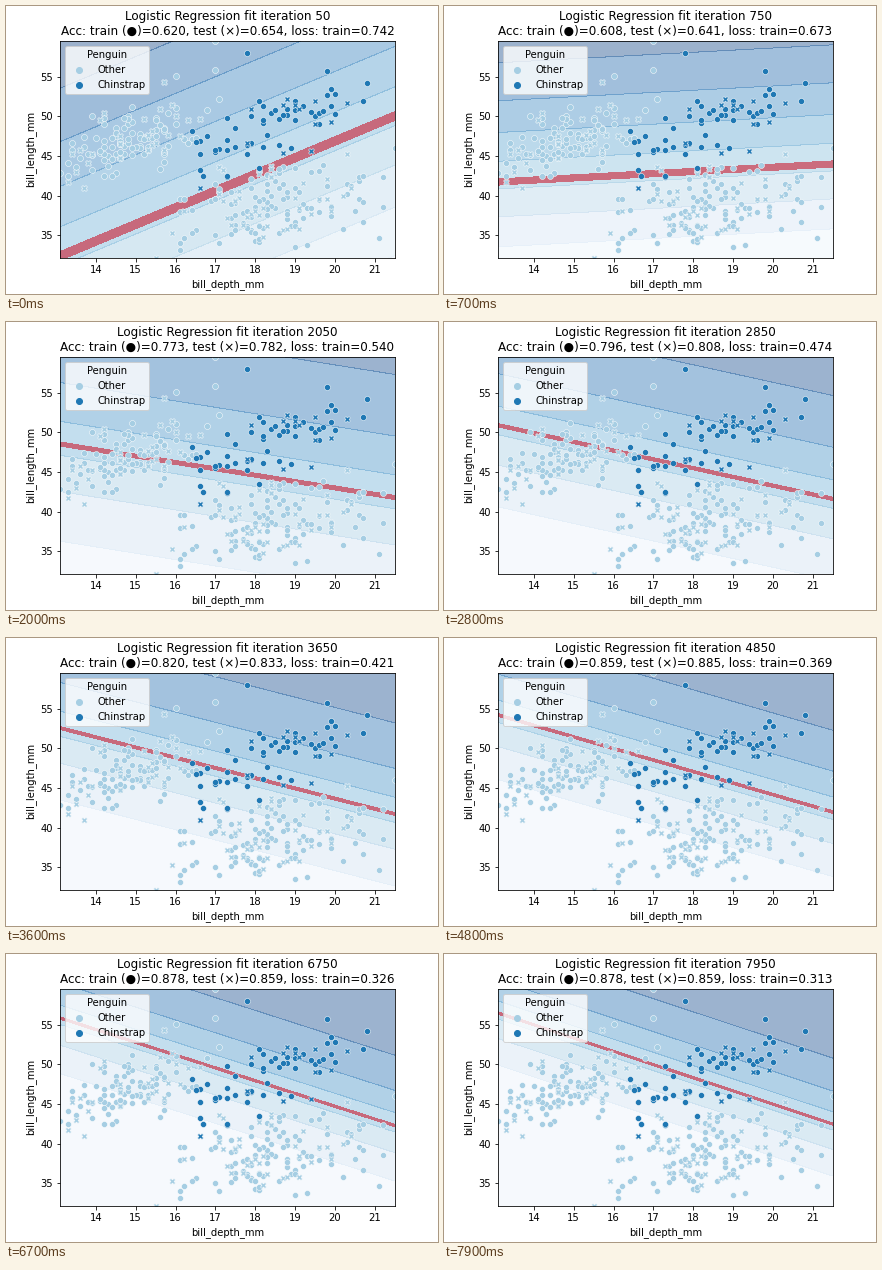
Write a matplotlib script that moves like this. It is 432 by 288 pixels and loops after 8 s.

```python
import numpy as np
import matplotlib.pyplot as plt
from matplotlib.animation import FuncAnimation

plt.rcParams.update({"font.family": "DejaVu Sans", "font.size": 10})

FRAMES, STEP = 80, 100
N_TRAIN, N_TEST = 255, 78
X0, X1, Y0, Y1 = 13.1, 21.5, 32.1, 59.6
LIGHT, DARK = "#a6cee3", "#1f78b4"

# Chinstrap penguins as (bill length, bill depth); the last 13 are test data.
CHINSTRAP = np.array([
    46.5, 17.9, 50, 19.5, 51.3, 19.2, 52.7, 19.8, 45.2, 17.8, 46.1, 18.2,
    51.3, 18.2, 46, 18.9, 51.3, 19.9, 47, 17.3, 52, 18.1, 45.9, 17.1,
    50.5, 19.6, 50.3, 20, 58, 17.8, 46.4, 18.6, 49.2, 18.2, 42.4, 17.3,
    48.5, 17.5, 43.2, 16.6, 50.6, 19.4, 46.7, 17.9, 52, 19, 50.5, 18.4,
    49.5, 19, 46.4, 17.8, 52.8, 20, 54.2, 20.8, 42.5, 16.7, 51, 18.8,
    49.7, 18.6, 47.5, 16.8, 47.6, 18.3, 52, 20.7, 46.9, 16.6, 53.5, 19.9,
    46.2, 17.5, 45.5, 17, 50.8, 18.5, 50.1, 17.9, 49, 19.6, 49.8, 17.3,
    48.1, 16.4, 50.7, 19.7, 42.5, 17.3, 45.2, 16.6, 50.2, 18.8, 46.8, 16.5,
    45.7, 17, 55.8, 19.8, 43.5, 18.1, 49.6, 18.2, 50.8, 19, 50.2, 18.7,
    45.7, 17.3,
    50.9, 17.9, 52.2, 18.8, 40.9, 16.6, 45.6, 19.4, 51.7, 20.3, 51.9, 19.5,
    49, 19.5, 49.3, 19.9, 45.4, 18.7, 46.6, 17.8, 51.5, 18.7, 50.9, 19.1,
    51.4, 19]).reshape(-1, 2)

# Outlying points of the other species, train then test.
EDGE_TRAIN = [(59.6, 17), (55.9, 17), (55.1, 16), (52.2, 17.1), (42.9, 13.1),
              (46, 21.5), (34.6, 21.1), (42.3, 21.2), (38.6, 21.2),
              (42.5, 20.7), (39.2, 20.7), (33.5, 19), (33.1, 16.1),
              (34, 17.1), (34.5, 18.1)]
EDGE_TEST = [(54.3, 15.7), (40.9, 13.7), (41.7, 13.3), (32.1, 15.5),
             (35.2, 15.9), (45.2, 20.3)]


def cloud(rng, n, length, depth, corr):
    """Correlated, truncated normal sample of (length, depth)."""
    z = rng.standard_normal((4 * n, 2))
    z[:, 1] = corr * z[:, 0] + np.sqrt(1 - corr ** 2) * z[:, 1]
    z = z[np.abs(z).max(axis=1) < 2][:n]
    return np.round(z * (length[1], depth[1]) + (length[0], depth[0]), 1)


rng = np.random.default_rng(8)
adelie = cloud(rng, 134, (38.8, 2.75), (18.35, 1.2), 0.36)
gentoo = cloud(rng, 110, (47.3, 2.6), (14.95, 0.98), 0.66)
train = [(np.vstack([adelie[:98], gentoo[:86], EDGE_TRAIN]), LIGHT),
         (CHINSTRAP[:-13], DARK)]
test = [(np.vstack([adelie[98:], gentoo[86:], EDGE_TEST]), LIGHT),
        (CHINSTRAP[-13:], DARK)]

# Fit state at a few times (s): boundary height at both sides and
# pixels per unit of logit.
KEYS = np.array([0, 0.7, 2.0, 3.6, 4.8, 6.7, 7.9])
LEFT = np.array([250, 176, 122, 90, 77, 64, 59])
RIGHT = np.array([110, 158, 175.5, 176, 174, 171.5, 170])
SCALE = np.array([121, 86, 56, 41.5, 37.2, 32, 30])
LOSS = np.array([0.742, 0.673, 0.540, 0.421, 0.369, 0.326, 0.313])
TRAIN_HITS = [158, 155, 197, 209, 219, 224, 224]
TEST_HITS = [51, 50, 61, 65, 69, 67, 67]


def smooth(t, values):
    """Cubic Hermite interpolation over KEYS."""
    slope = np.gradient(values, KEYS, edge_order=2)
    i = min(np.searchsorted(KEYS, t, side="right") - 1, len(KEYS) - 2)
    h = KEYS[i + 1] - KEYS[i]
    s = (t - KEYS[i]) / h
    return ((1 + 2 * s) * (1 - s) ** 2 * values[i]
            + s * (1 - s) ** 2 * h * slope[i]
            + s * s * (3 - 2 * s) * values[i + 1]
            + s * s * (s - 1) * h * slope[i + 1])


gx, gy = np.meshgrid(np.linspace(X0, X1, 100), np.linspace(Y0, Y1, 100))
u, v = (gx - X0) / (X1 - X0), (gy - Y0) / (Y1 - Y0)


def probability(t):
    bias = smooth(t, (LEFT - 252) / SCALE)
    wx = smooth(t, (RIGHT - LEFT) / SCALE)
    wy = smooth(t, 217.44 / SCALE)
    return 1 / (1 + np.exp(-(bias + wx * u + wy * v)))


fig, ax = plt.subplots(figsize=(6, 4), dpi=72)
fig.subplots_adjust(left=0.125, right=0.9, bottom=0.125, top=0.88)

for groups, marker in ((train, "o"), (test, "X")):
    for pts, color in groups:
        ax.scatter(pts[:, 1], pts[:, 0], s=36, c=color, marker=marker,
                   edgecolors="w", linewidths=0.48, zorder=2)

handles = [ax.scatter([], [], s=36, c=c) for c in (LIGHT, DARK)]
ax.legend(handles, ["Other", "Chinstrap"], title="Penguin", loc="upper left")
ax.set(xlim=(X0, X1), ylim=(Y0, Y1),
       xlabel="bill_depth_mm", ylabel="bill_length_mm")
title = ax.set_title("")
fills = []


def update(k):
    t = k * STEP / 1000
    while fills:
        fills.pop().remove()
    p = probability(t)
    fills.append(ax.contourf(gx, gy, p, cmap="Blues", alpha=0.4, zorder=1))
    fills.append(ax.contourf(gx, gy, p, levels=[0.491, 0.509],
                             colors=["#cb1c30"], alpha=0.6, zorder=1.1))
    ax.set(xlim=(X0, X1), ylim=(Y0, Y1))
    acc = round(np.interp(t, KEYS, TRAIN_HITS)) / N_TRAIN
    acc_test = round(np.interp(t, KEYS, TEST_HITS)) / N_TEST
    title.set_text(
        f"Logistic Regression fit iteration {50 + 100 * k}\n"
        f"Acc: train (\u25cf)={acc:.3f}, test (\u00d7)={acc_test:.3f}, "
        f"loss: train={smooth(t, LOSS):.3f}")
    return [title]


anim = FuncAnimation(fig, update, frames=FRAMES, interval=STEP,
                     init_func=lambda: [title], repeat=True, repeat_delay=0)
plt.show()
```
